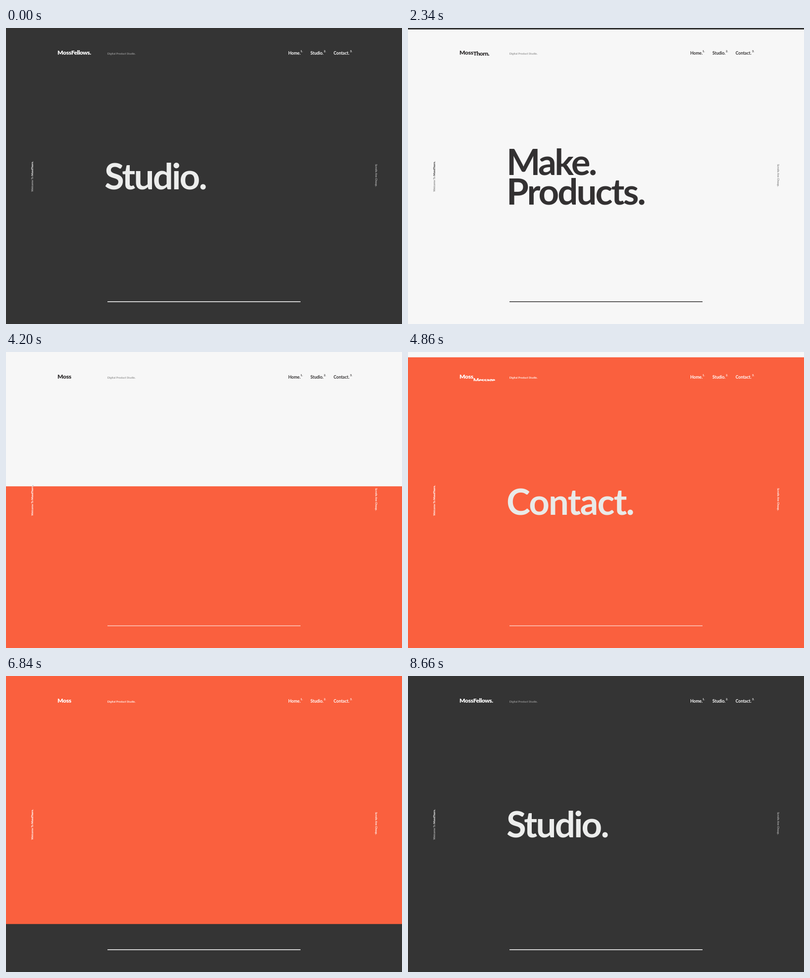
Recreate the animation shown at these times as an HTML page with a canvas. Size 800 px wide and 600 px high, loop 9 s.

```html
<!DOCTYPE html>
<html lang="en">
<head>
<meta charset="utf-8">
<title>Digital Product Studio</title>
<style>
  html, body { margin: 0; width: 100%; height: 100%; overflow: hidden; background: #343434; }
  canvas { display: block; }
</style>
</head>
<body>
<canvas id="stage" width="800" height="600"></canvas>
<script>
const W = 800, H = 600, LOOP = 9000;
const ctx = document.getElementById('stage').getContext('2d');

// Each title line: text and letter spacing.
const scenes = [
  { bg: '#343434', ink: '#ffffff', title: '#ecedec', soft: '#929292', side: '#b4b4b4', brand: '#e4e4e4',
    rule: 1.5, suffix: 'Fellows.', lines: [['Studio.', -2.8]] },
  { bg: '#f7f7f7', ink: '#333132', title: '#333132', soft: '#999999', side: '#858585', brand: '#4a4849',
    rule: 1.5, suffix: 'Thorn.', lines: [['Make.', -3.5], ['Products.', -2.9]] },
  { bg: '#fa603e', ink: '#ffffff', title: '#e9eae8', soft: '#ffeee8', side: '#ffffff', brand: '#ffffff',
    rule: 1, suffix: 'Message.', lines: [['Contact.', -1.9]] }
];
const starts = [740, 3520, 6285];
const nav = [['Home.', 570.2, 595], ['Studio.', 615, 642], ['Contact.', 661.8, 695]];

const progress = (t, from, length) => Math.min(1, Math.max(0, (t - from) / length));
const expoOut = u => u >= 1 ? 1 : 1 - 2 ** (-10 * u);
const cubicInOut = u => u < .5 ? 4 * u ** 3 : 1 - 4 * (1 - u) ** 3;

function text(str, x, y, size, color, weight = 700, spacing = 0) {
  ctx.font = `${weight} ${size}px Lato, "Open Sans", sans-serif`;
  ctx.letterSpacing = spacing + 'px';
  ctx.fillStyle = color;
  ctx.fillText(str, x, y);
  return ctx.measureText(str).width;
}

function clipped(top, bottom, draw) {
  ctx.save();
  ctx.beginPath();
  ctx.rect(0, top, W, bottom - top);
  ctx.clip();
  draw();
  ctx.restore();
}

function turned(x, y, angle, draw) {
  ctx.save();
  ctx.translate(x, y);
  ctx.rotate(angle);
  draw();
  ctx.restore();
}

// Shifts run from 1 (below its mask) through 0 (in place) to -1 (above).
function drawScene(s, titleShift, suffixShift) {
  ctx.fillStyle = s.bg;
  ctx.fillRect(0, 0, W, H);

  const logoEnd = 104 + text('Moss', 104, 54, 12, s.ink, 900, -.3);
  clipped(39, 59, () => text(s.suffix, logoEnd, 54 + 20 * suffixShift, 12, s.ink, 900, -.5));
  text('Digital Product Studio.', 204.7, 53.5, 5.7, s.soft);
  nav.forEach(([label, x, numX], i) => {
    text(label, x, 53.5, 8.5, s.ink);
    text(i + 1 + '.', numX, 48.7, 5.6, s.ink);
  });

  turned(55, 331.7, -Math.PI / 2, () => {
    const w = text('Welcome To ', 0, 0, 5.6, s.side);
    text('MossThorn.', w, 0, 5.6, s.brand, 900);
  });
  turned(745.5, 276, Math.PI / 2, () => text('Scrolls Are Cheap.', 0, 0, 5.7, s.side));

  s.lines.forEach(([str, spacing], i) => {
    const base = 326.5 + 60 * i - 30 * (s.lines.length - 1);
    clipped(base - 57, base + 18, () =>
      text(str, 199, base + 75 * titleShift(i), 72.5, s.title, 700, spacing));
  });

  ctx.fillStyle = s.ink;
  ctx.fillRect(205, 555.5 - s.rule, 390, s.rule);
}

function draw(time) {
  const step = starts.filter(s => time >= s).length;
  const next = scenes[step % 3];
  if (!step) return drawScene(next, () => 0, 0);

  const t = time - starts[step - 1];
  const edge = H * (1 - expoOut(progress(t, 520, 1413)));
  const leave = -cubicInOut(progress(t, 0, 560));
  clipped(0, edge, () => drawScene(scenes[step - 1], () => leave, leave));
  clipped(edge, H, () => drawScene(next,
    i => 1 - expoOut(progress(t, 689 + 60 * i, 1490)),
    1 - expoOut(progress(t, 1160, 1200))));
}

const origin = performance.now();
function frame() {
  draw((performance.now() - origin) % LOOP);
  requestAnimationFrame(frame);
}
frame();
</script>
</body>
</html>
```
